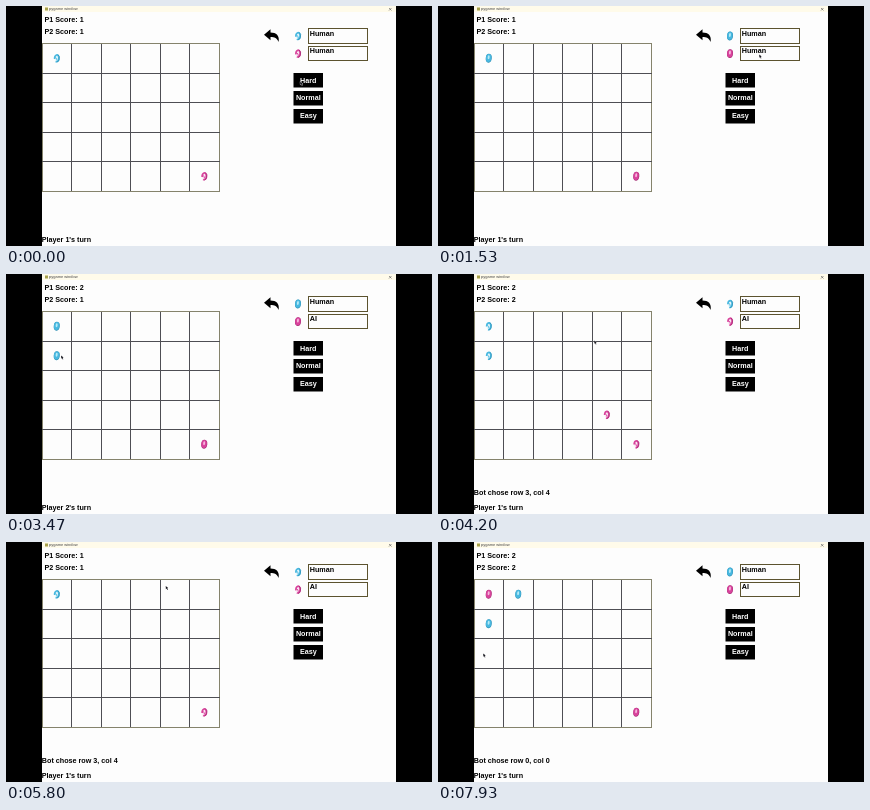
Animation, 426 px wide and 240 px high, one loop 8000 ms. Source, as an HTML page with a canvas:

```html
<!DOCTYPE html>
<html lang="en">
<head>
<meta charset="utf-8">
<title>Board game</title>
<style>
html, body { margin: 0; width: 100%; height: 100%; overflow: hidden; background: #000; }
canvas { display: block; width: 100%; height: 100%; }
</style>
</head>
<body>
<canvas id="stage" width="426" height="240"></canvas>
<script>
const ctx = document.getElementById('stage').getContext('2d');
const LOOP = 8000, CELL = 29.5, LEFT = 36, TOP = 37.5;
const BLUE = { base: '#48b8e0', dark: '#2f8fb4', light: '#b5ebf7', pale: '#e4f6fb' };
const PINK = { base: '#d8439c', dark: '#a32a72', light: '#f7b4dc', pale: '#fae6f2' };
const FONT = '"Liberation Sans", Arial, sans-serif';

// Moments at which the game state changes
const T = { ai: 1730, move: 3270, bot: 3600, undo: 5130, add: 6530, spread: 6930, turn2: 7200, bot2: 7530 };

// Pointer stops: time, x, y
const PATH = [
  [0, 295, 76], [400, 297, 79], [1150, 322, 49], [1900, 322, 49],
  [2500, 300, 62], [2950, 150, 78], [3200, 52, 82], [3500, 56, 82],
  [4050, 157, 67], [4300, 157, 67], [4850, 263, 32], [5250, 263, 32],
  [6350, 58, 57], [6900, 57, 57], [7600, 46, 112], [8000, 46, 112]
];

// How open the hook of the gem is in each step of its spin
const SPIN = [0.4, 0.2, 0, 0, 0.7, 1, 0.8, 0.6];

const ease = k => k * k * (3 - 2 * k);
const mix = (a, b, k) => a + (b - a) * k;

function label(str, x, y, color = '#000', align = 'left', font = 'bold 7.2px ') {
  ctx.font = font + FONT;
  ctx.fillStyle = color;
  ctx.textAlign = align;
  ctx.fillText(str, x, y);
}

function oval(x, y, rx, ry, color) {
  ctx.fillStyle = color;
  ctx.beginPath();
  ctx.ellipse(x, y, rx, ry, 0, 0, Math.PI * 2);
  ctx.fill();
}

function hook(rx, ry, from, to, width, color) {
  ctx.strokeStyle = color;
  ctx.lineWidth = width;
  ctx.beginPath();
  ctx.ellipse(0, 0, rx, ry, 0, from * Math.PI, to * Math.PI);
  ctx.stroke();
}

function gem(x, y, tone, t) {
  const step = Math.floor((t % 640) / 80);
  const open = SPIN[step];
  ctx.save();
  ctx.translate(x, y);
  ctx.rotate(0.1);
  if (open) {
    oval(-0.2, 0, 1.9, 3, tone.pale);
    hook(2.1, 3.4, 0.85 + open * 0.15, 2.7 - open * 0.2, 1.7, tone.base);
    hook(2.6, 3.9, 1.6, 2.45, 0.7, tone.dark);
    ctx.strokeStyle = tone.base;
    ctx.lineWidth = 0.9;
    ctx.beginPath();
    ctx.moveTo(-1.4, -0.6);
    ctx.quadraticCurveTo(0.4, -0.2, 0.4, 2);
    ctx.stroke();
  } else {
    oval(0, 0, 3, 4.4, tone.dark);
    oval(-0.15, -0.2, 2.7, 4, tone.base);
    oval(step === 2 ? -0.7 : -0.2, -1, 1, 2, tone.light);
  }
  ctx.restore();
}

function cellGem(row, col, tone, t, dx = 0) {
  gem(LEFT + CELL * (col + 0.5) + dx, TOP + CELL * (row + 0.5), tone, t);
}

function frameBox(x, y, w, h) {
  ctx.strokeStyle = '#5c532f';
  ctx.lineWidth = 1;
  ctx.strokeRect(x + 0.5, y + 0.5, w, h);
}

function windowBar() {
  ctx.fillStyle = '#fdfdfd';
  ctx.fillRect(36, 0, 354, 240);
  ctx.fillStyle = '#fffbea';
  ctx.fillRect(36, 0, 354, 6);
  ctx.fillStyle = '#a8a24c';
  ctx.fillRect(39, 1.5, 3, 3);
  label('pygame window', 43, 4.4, '#444', 'left', '4px ');
  ctx.strokeStyle = '#555';
  ctx.lineWidth = 0.6;
  ctx.beginPath();
  ctx.moveTo(383, 2); ctx.lineTo(385.5, 4.5);
  ctx.moveTo(385.5, 2); ctx.lineTo(383, 4.5);
  ctx.stroke();
}

function grid() {
  const shade = (i, last) => i % last ? '#4e4e54' : '#85836c';
  for (let i = 0; i <= 6; i++) {
    ctx.fillStyle = shade(i, 6);
    ctx.fillRect(Math.floor(LEFT + CELL * i), 37, 1, 149);
  }
  for (let i = 0; i <= 5; i++) {
    ctx.fillStyle = shade(i, 5);
    ctx.fillRect(36, Math.floor(TOP + CELL * i), 178, 1);
  }
}

function backArrow() {
  ctx.fillStyle = '#000';
  ctx.beginPath();
  ctx.moveTo(258, 28.7);
  ctx.lineTo(264.5, 23.2);
  ctx.lineTo(264.5, 26.4);
  ctx.bezierCurveTo(270.3, 26.4, 273.8, 29.5, 272.6, 36);
  ctx.bezierCurveTo(271.3, 32.3, 268.5, 31, 264.5, 31);
  ctx.lineTo(264.5, 34.2);
  ctx.closePath();
  ctx.fill();
}

function panel(t) {
  backArrow();
  gem(292, 30, BLUE, t);
  gem(292, 47.6, PINK, t);
  frameBox(302, 22, 59, 15);
  frameBox(302, 40, 59, 14);
  label('Human', 303.7, 29.9);
  label(t < T.ai ? 'Human' : 'AI', 303.7, 47.4);
  ['Hard', 'Normal', 'Easy'].forEach((name, i) => {
    const y = 67 + i * 17.8;
    ctx.fillStyle = '#000';
    ctx.fillRect(287.5, Math.round(y), 29.5, 14.5);
    label(name, 302.3, y + 9.6, '#fff', 'center');
  });
}

function pieces(t) {
  cellGem(4, 5, PINK, t);
  if (t < T.add) {
    cellGem(0, 0, BLUE, t);
    if (t >= T.move && t < T.undo) cellGem(1, 0, BLUE, t);
    if (t >= T.bot && t < T.undo) cellGem(3, 4, PINK, t);
  } else if (t < T.spread) {
    cellGem(0, 0, BLUE, t, -4.8);
    cellGem(0, 0, BLUE, t, 4.8);
  } else {
    const k = Math.min(1, (t - T.spread) / (T.turn2 - T.spread));
    cellGem(0, k, BLUE, t);
    cellGem(k, 0, BLUE, t);
    if (t >= T.bot2) cellGem(0, 0, PINK, t);
  }
}

function messages(t) {
  const first = (t >= T.move && t < T.undo) || t >= T.turn2;
  const second = (t >= T.bot && t < T.undo) || t >= T.bot2;
  label('P1 Score: ' + (first ? 2 : 1), 38.5, 16.3);
  label('P2 Score: ' + (second ? 2 : 1), 38.5, 28.2);
  if (t >= T.bot) label(t < T.bot2 ? 'Bot chose row 3, col 4' : 'Bot chose row 0, col 0', 35.8, 220.7);
  const waiting = (t >= T.move && t < T.bot) || (t >= T.turn2 && t < T.bot2);
  const overflow = t >= T.add && t < T.turn2;
  label(overflow ? 'Overflowing' : waiting ? "Player 2's turn" : "Player 1's turn", 35.8, 235.7);
}

function pointer(t) {
  if (t > 2500 && t < 2950) return;
  const i = PATH.findIndex((p, n) => n && t <= p[0]);
  const [t0, x0, y0] = PATH[i - 1], [t1, x1, y1] = PATH[i];
  const k = ease((t - t0) / (t1 - t0));
  ctx.save();
  ctx.translate(mix(x0, x1, k), mix(y0, y1, k));
  ctx.beginPath();
  [[-0.8, -0.4], [-0.6, 2.7], [0.1, 2.1], [0.8, 3.5], [1.4, 3.2], [0.8, 1.8], [1.7, 1.6]]
    .forEach(p => ctx.lineTo(...p));
  ctx.closePath();
  ctx.strokeStyle = '#fff';
  ctx.lineWidth = 0.6;
  ctx.stroke();
  ctx.fillStyle = '#14141c';
  ctx.fill();
  ctx.restore();
}

function draw(now) {
  const t = now % LOOP;
  ctx.fillStyle = '#000';
  ctx.fillRect(0, 0, 426, 240);
  windowBar();
  grid();
  panel(t);
  pieces(t);
  messages(t);
  pointer(t);
}

let start;
function tick(now) {
  start ??= now;
  draw(now - start);
  requestAnimationFrame(tick);
}
draw(0);
requestAnimationFrame(tick);
</script>
</body>
</html>
```
